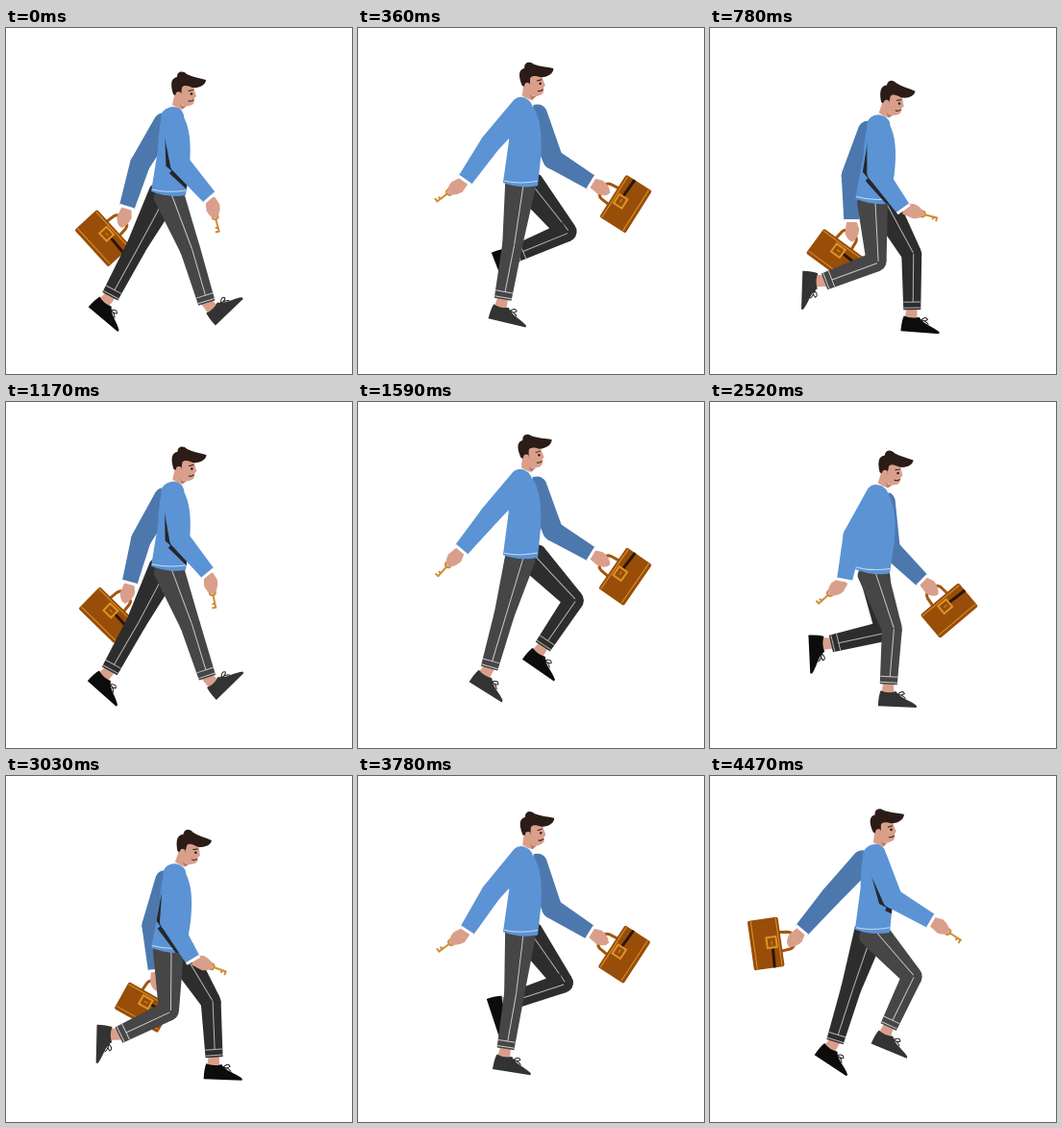
Recreate the animation shown at these times as an HTML page without scripts. Size 360 by 360 pixels, loop 4500 ms.

```html
<!DOCTYPE html>
<html lang="en">
<head>
<meta charset="utf-8">
<title>Walking man</title>
<style>
  @property --p { syntax: "<angle>"; inherits: true; initial-value: 0deg; }

  html, body { margin: 0; width: 100%; height: 100%; overflow: hidden; background: #fff; }
  svg { display: block; width: 100%; height: 100%; animation: walk 4.5s steps(125) infinite; }

  /* One stride takes 1145 ms; the loop cuts back to its start before the fourth ends. */
  @keyframes walk { to { --p: 1414.8deg; } }

  .near { --a: var(--p); --cloth: #464646; --seam: #c9c9c9; --shoe: #333; --sleeve: #5b93d5; }
  .far { --a: calc(var(--p) + 180deg); --cloth: #2d2d2d; --seam: #b5b5b5; --shoe: #0c0c0c; --sleeve: #4c78ae; }

  .bob { translate: 0 calc(1px * (10.5 * sin(2 * var(--p)) + cos(2 * var(--p)))); }
  .lean { transform-origin: 169px 172px; rotate: calc(1.8deg * sin(2 * var(--p))); }
  .head { transform-origin: 178px 82px; rotate: calc(5deg * sin(2 * var(--p))); }
  .far.hip { translate: calc(174px - 10px * cos(var(--p))) 172px; }
  .near.hip { translate: 169px 172px; }
  .far.shoulder { translate: calc(172px + 13px * cos(var(--p) - 120deg)) 98px; }
  .near.shoulder { translate: 173px 91px; }

  /* Limb angles in degrees from straight down, forward positive. */
  .hip {
    --thigh: (10 + 29 * cos(var(--a)) - 8.5 * sin(var(--a)) - 8 * cos(2 * var(--a))
      - 4.5 * cos(3 * var(--a)) - 5 * cos(4 * var(--a)));
    --shin: (-25.3 + 18.7 * cos(var(--a)) + 34 * sin(var(--a)) + 18.7 * cos(2 * var(--a))
      + 3.8 * cos(3 * var(--a)) - 2.5 * sin(3 * var(--a)) + 1.3 * cos(4 * var(--a)));
    --foot: (29.2 - 35.2 * cos(var(--a)) - 37.7 * sin(var(--a)) - 20.6 * cos(2 * var(--a))
      + 3.9 * sin(2 * var(--a)) - 6.7 * cos(3 * var(--a)) + 2 * sin(3 * var(--a)) - 10.4 * cos(4 * var(--a)));
  }
  .thigh { rotate: calc(-1deg * var(--thigh)); }
  .shin { rotate: calc(1deg * (var(--thigh) - var(--shin))); }
  .foot { rotate: calc(1deg * (var(--foot) + var(--shin))); }

  .shoulder {
    --upper: (-11 + 20.5 * cos(var(--a)) - 26 * sin(var(--a)));
    --fore: (13.7 + 29 * cos(var(--a)) - 40 * sin(var(--a)) - 1.6 * cos(2 * var(--a))
      + 4.8 * sin(2 * var(--a)) - 2.3 * sin(3 * var(--a)));
  }
  .upper { rotate: calc(-1deg * var(--upper)); }
  .fore { rotate: calc(1deg * (var(--upper) - var(--fore))); }
  .wrist { rotate: calc(40deg * cos(var(--a) - 50deg)); }
  .bag { rotate: calc(23deg - 22deg * cos(var(--a) - 290deg)); }

  .cloth { fill: var(--cloth); }
  .seam { fill: none; stroke: var(--seam); stroke-width: 1; }
  .shoe { fill: var(--shoe); }
  .sleeve { fill: var(--sleeve); }
  .skin { fill: #d99f8b; }
  .dark { fill: #26262a; }
  .cuff { stroke: #fff; stroke-width: 3; }
  .line { fill: none; stroke: #2b1c18; stroke-linecap: round; }
  .gold { fill: none; stroke: #dc9427; }
  .key { fill: none; stroke: #cf8d35; stroke-width: 2; }
</style>
</head>
<body>
<svg viewBox="0 0 360 360">
  <defs>
    <path id="torso" d="M167 83L184 90C191 102 193 118 191 142L187 173Q169 176 151 169L158 126C159 106 160 91 167 83Z"/>
    <clipPath id="body"><use href="#torso"/></clipPath>

    <g id="leg">
      <g class="thigh">
        <path class="cloth" d="M-16 0Q-15-9 0-10Q15-9 16 0L10.5 62H-10.5Z"/>
        <circle class="cloth" cy="62" r="10.5"/>
        <path class="seam" d="M3-2L2 62"/>
        <g transform="translate(0 62)"><g class="shin">
          <g transform="translate(0 57)"><g class="foot">
            <path class="skin" d="M-5-6H5L6 11H-7Z"/>
            <path class="shoe" d="M-8 8Q0 11 8 8C12 15 24 17 30 22V24H-10Q-10 14-8 8Z"/>
            <path class="line" stroke-width="1" d="M10 11Q15 6 17 10Q14 13 10 11Q16 12 18 15"/>
          </g></g>
          <path class="cloth" d="M-10.5 0H10.5L9 58H-9Z"/>
          <path class="seam" d="M2 0L1 50M-9 50H9M-9 56H9"/>
        </g></g>
      </g>
    </g>

    <path id="upperArm" d="M-12 0Q-11-9 0-10Q11-9 12 0L10.5 50A10.5 10.5 0 0 1-10.5 50Z"/>
    <path id="foreArm" d="M-10.5 0A10.5 10.5 0 0 1 10.5 0L8 47H-8Z"/>
    <path id="hand" class="skin" d="M-5 0H5L8 9Q7 18 1 22Q-5 21-7 12Z"/>

    <g id="briefcase">
      <path d="M-10 15L-9 5Q-8 0-3 0H3Q8 0 9 5L10 15" fill="#fff" stroke="#a3560d" stroke-width="3"/>
      <rect x="-26" y="13" width="52" height="32" rx="2" fill="#984d08"/>
      <path d="M6 21L26 22V25L6 24Z" fill="#2a1605"/>
      <path class="gold" d="M-25 15.500H25M-25 41.500H25"/>
      <rect class="gold" x="-6" y="18" width="11" height="10" stroke-width="2"/>
      <path class="gold" d="M-2 23H2"/>
    </g>
  </defs>

  <g class="bob">
    <g class="far shoulder">
      <g class="upper">
        <use href="#upperArm" class="sleeve"/>
        <g transform="translate(0 50)"><g class="fore">
          <g transform="translate(0 60)"><g class="bag"><use href="#briefcase"/></g></g>
          <use href="#hand" y="47"/>
          <use href="#foreArm" class="sleeve"/>
          <path class="cuff" d="M-8 47H8"/>
        </g></g>
      </g>
    </g>

    <g class="far hip"><use href="#leg"/></g>
    <g class="near hip"><use href="#leg"/></g>

    <g class="lean">
      <g class="head">
        <path class="skin" d="M176 58L195 57Q196 65 198 70L196 72Q197 79 190 80Q186 81 183 79L183 88L172 83L175 70Z"/>
        <path d="M181 78Q184 81 188 80L183 84Z" fill="#b87a69"/>
        <path d="M174 68C170 55 173 51 178 50C178 44 184 43 188 47C194 50 202 51 208 53C208 58 201 62 194 61C189 59 185 58 183 61L182 69Q178 64 176 69Z" fill="#2b1c18"/>
        <circle class="skin" cx="179.500" cy="68" r="2.800"/>
        <path class="line" d="M190 64.500L194.500 63.500M190 75Q193 76 195 74"/>
        <circle cx="193" cy="67.500" r="1.300" fill="#2b1c18"/>
      </g>
      <use href="#torso" fill="#5b93d5"/>
      <path d="M167 84L172 78Q178 83 185 84L184 91Q175 89 167 84Z" fill="#f6f6f6"/>
      <path d="M152 167Q168 171 187 168" fill="none" stroke="#c6daf0"/>

      <g clip-path="url(#body)">
        <g class="near shoulder"><g class="upper">
          <path class="dark" d="M-10 12L-15 50L-8 58L8 50V12Z"/>
          <g transform="translate(0 50)"><g class="fore">
            <path class="dark" d="M-15 0L8-4V46H-10Z"/>
          </g></g>
        </g></g>
      </g>

      <g class="near shoulder">
        <g class="upper">
          <use href="#upperArm" class="sleeve"/>
          <g transform="translate(0 50)"><g class="fore">
            <g transform="translate(0 47)"><g class="wrist">
              <path class="key" d="M0 22V37M0 36H-4M0 32H-3"/>
              <circle class="key" cy="20" r="3"/>
              <use href="#hand"/>
            </g></g>
            <use href="#foreArm" class="sleeve"/>
            <path class="cuff" d="M-8 47H8"/>
          </g></g>
        </g>
      </g>
    </g>
  </g>
</svg>
</body>
</html>
```
